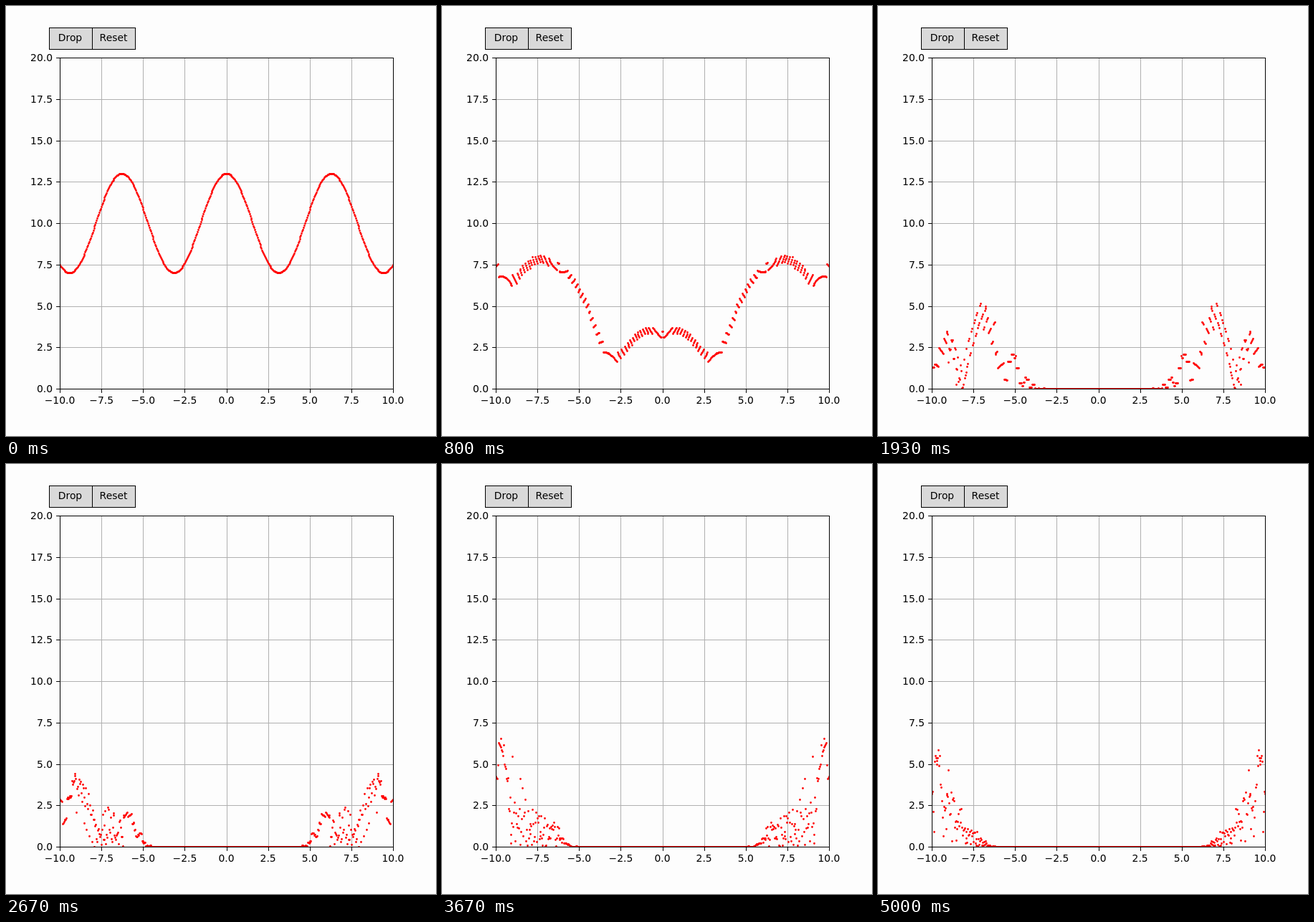
An HTML page for the animation above (5.07 s loop, 600 by 600 pixels).

```html
<!DOCTYPE html>
<html lang="en">
<head>
<meta charset="utf-8">
<title>Bouncing points</title>
<style>
  html, body { margin: 0; width: 100%; height: 100%; overflow: hidden; background: #fdfdfd; }
  svg { display: block; width: 600px; height: 600px; }
  text { font: 13.89px "DejaVu Sans", sans-serif; }
  .grid { stroke: #b0b0b0; }
  .line { stroke: #000; fill: none; }
  .button { stroke: #000; fill: #d9d9d9; }
  #dots { stroke: #f00; stroke-width: 2.8; stroke-linecap: round; fill: none; }
</style>
</head>
<body>
<svg viewBox="0 0 600 600">
  <clipPath id="area"><rect x="75" y="72" width="466" height="463"/></clipPath>
  <path class="grid" id="grid"/>
  <g clip-path="url(#area)"><path id="dots"/></g>
  <path class="line" id="ticks"/>
  <rect class="line" x="75.5" y="72.5" width="465" height="462"/>
  <rect class="button" x="60.5" y="30.5" width="60" height="30"/>
  <rect class="button" x="120.5" y="30.5" width="60" height="30"/>
  <g id="labels"></g>
</svg>
<script>
const LOOP = 5070, FPS = 15, LAST = 75;
const POINTS = 500;
const GRAVITY = 0.0098; // height units per step squared

const el = id => document.getElementById(id);
const snap = v => Math.round(v) + 0.5;
const px = x => snap(75 + 23.25 * (x + 10));
const py = y => snap(534 - 23.1 * y);

function label(x, y, text, anchor = "middle") {
  el("labels").innerHTML += `<text x="${x}" y="${y}" text-anchor="${anchor}">${text}</text>`;
}

function drawAxes() {
  let grid = "", ticks = "";
  for (let i = 0; i <= 8; i++) {
    const xv = -10 + 2.5 * i, yv = 2.5 * i;
    const x = px(xv), y = py(yv);
    grid += `M${x} 72V534M75 ${y}H540`;
    ticks += `M${x} 535v4.9M75 ${y}h-4.9`;
    label(75 + 58.125 * i, 555, xv.toFixed(1).replace("-", "\u2212"));
    label(65, Math.round(534 - 57.75 * i) + 5, yv.toFixed(1), "end");
  }
  el("grid").setAttribute("d", grid);
  el("ticks").setAttribute("d", ticks);
  label(89.5, 49, "Drop");
  label(150, 49, "Reset");
}

// Each point falls and loses speed at the floor; bounce grows with distance from the middle.
function height(x, steps) {
  const bounce = 0.5 + 0.05 * Math.abs(x);
  let y = 10 + 3 * Math.cos(x), v = 0;
  while (steps-- > 0) {
    v -= GRAVITY;
    y += v;
    if (y < 0) {
      y *= -bounce;
      v *= -bounce;
    }
  }
  return y;
}

let shown = -1;
function draw(now) {
  const frame = Math.min(LAST, Math.floor((now % LOOP + 3.4) * FPS / 1000));
  if (frame === shown) return;
  shown = frame;
  const steps = Math.ceil(frame * 20 / 3) - 3;
  let d = "";
  for (let i = 0; i < POINTS; i++) {
    const x = -10 + 20 * i / (POINTS - 1);
    d += `M${px(x)} ${py(height(x, steps))}h0`;
  }
  el("dots").setAttribute("d", d);
}

drawAxes();
const start = performance.now();
function tick() {
  draw(performance.now() - start);
  requestAnimationFrame(tick);
}
tick();
</script>
</body>
</html>
```
